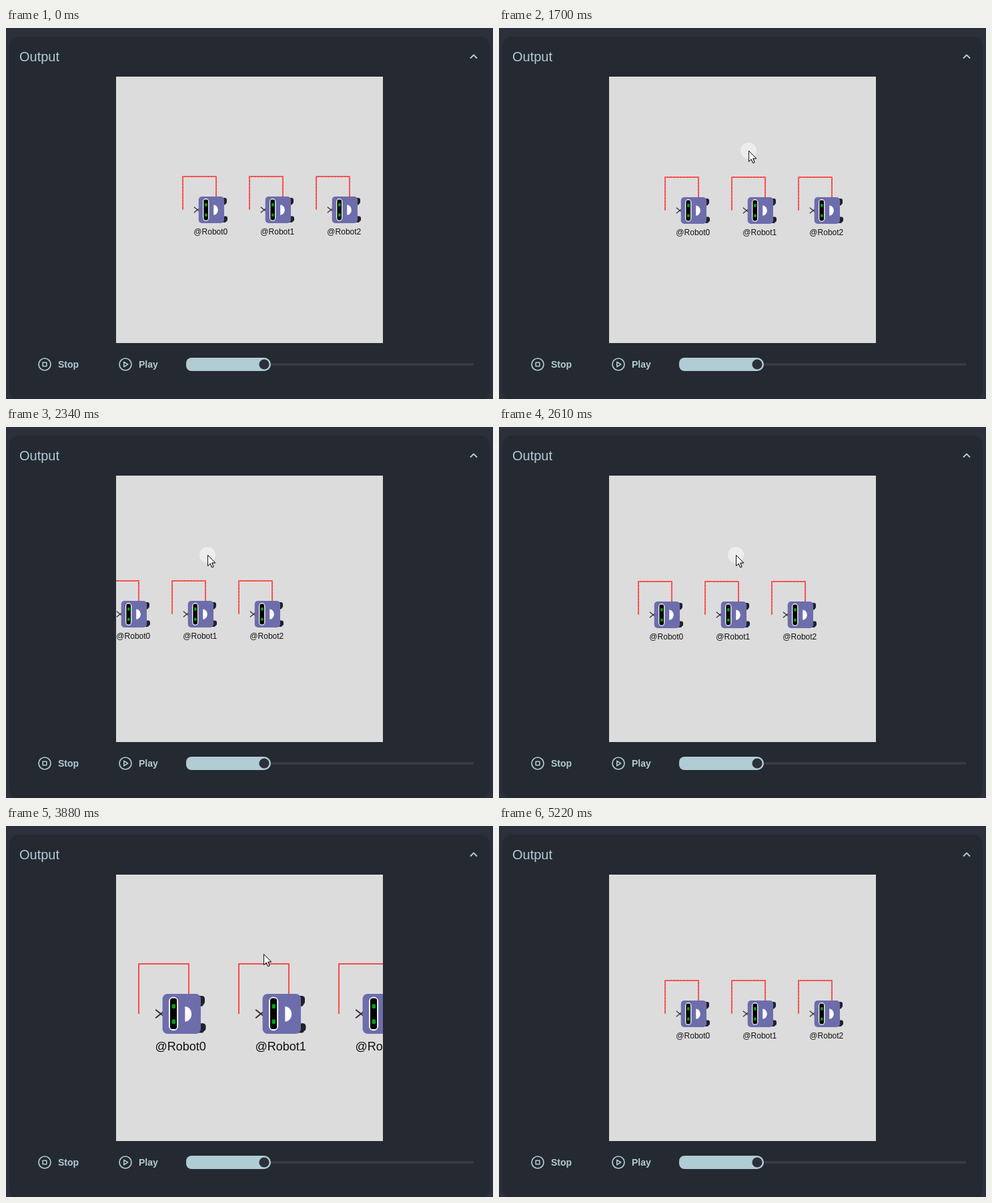
Recreate the animation shown at these times as an HTML page with a canvas. Size 730x557 px, loop 5.73 s.

```html
<!DOCTYPE html>
<html lang="en">
<head>
<meta charset="utf-8">
<title>Output</title>
<style>
  html, body { margin: 0; width: 100%; height: 100%; overflow: hidden; background: #2b303b; }
  canvas { display: block; }
</style>
</head>
<body>
<canvas id="stage" width="730" height="557"></canvas>
<script>
const ctx = document.getElementById('stage').getContext('2d');
const LOOP = 5730, STEP = 29.2, LAG = 55;
const FONT = '"Liberation Sans", Arial, sans-serif';
const PANEL = '#252932', MIST = '#b0ccd5', INK = '#1f2230';

// Sideways drag: [ms, x]
const SWING = [[1485, 0], [1905, -71], [2200, -127], [2285, -116], [2340, -99], [2585, -49], [2840, -15.5]];

const clamp = (v, lo = 0, hi = 1) => Math.min(hi, Math.max(lo, v));
const progress = (t, from, to) => clamp((t - from) / (to - from));

// Smooth curve through the keys, at rest at both ends
function follow(keys, t) {
  const last = keys.length - 1;
  if (t <= keys[0][0]) return keys[0][1];
  if (t >= keys[last][0]) return keys[last][1];
  const i = keys.findIndex(k => k[0] > t) - 1;
  const [t0, a] = keys[i], [t1, b] = keys[i + 1];
  const span = t1 - t0, u = (t - t0) / span, v = 1 - u;
  const slope = j => j === 0 || j === last ? 0 :
    (keys[j + 1][1] - keys[j - 1][1]) / (keys[j + 1][0] - keys[j - 1][0]) * span;
  return a * (1 + 2 * u) * v * v + slope(i) * u * v * v +
    b * u * u * (3 - 2 * u) - slope(i + 1) * u * u * v;
}

function bezier(a, b, c, d, u) {
  const v = 1 - u;
  return [0, 1].map(k =>
    a[k] * v ** 3 + 3 * b[k] * v * v * u + 3 * c[k] * v * u * u + d[k] * u ** 3);
}

const dragAt = t => [follow(SWING, t), 9 * progress(t, 1485, 2340) ** 1.6];

function cursorAt(t) {
  if (t < 1200) {
    const u = 1 - (1 - progress(t, 330, 1030)) ** 2;
    return bezier([450, 555], [400, 380], [310, 190], [401, 183], u);
  }
  if (t > 4600) {
    const u = progress(t, 4650, 5220) ** 1.4;
    return bezier([386, 192], [395, 230], [460, 400], [504, 560], u);
  }
  const [dx, dy] = dragAt(t);
  return [401 + dx, 183 + dy];
}

function zoomAt(t) {
  const steps = (from, every) => clamp(Math.floor((t - from) / every) + 1, 0, 6);
  return 1 + (steps(3260, 68) - steps(3880, 50)) / 10;
}

function box(x, y, w, h, r, color) {
  ctx.beginPath();
  ctx.roundRect(x, y, w, h, r);
  ctx.fillStyle = color;
  ctx.fill();
}

function disc(x, y, r, color) {
  ctx.beginPath();
  ctx.arc(x, y, r, 0, 7);
  ctx.fillStyle = color;
  ctx.fill();
}

function line(points, color, width, closed) {
  ctx.beginPath();
  points.forEach(p => ctx.lineTo(...p));
  if (closed) ctx.closePath();
  ctx.strokeStyle = color;
  ctx.lineWidth = width;
  ctx.stroke();
}

function label(text, x, y, font, color) {
  ctx.font = font + ' ' + FONT;
  ctx.fillStyle = color;
  ctx.fillText(text, x, y);
}

function button(x, text, icon) {
  ctx.beginPath();
  ctx.arc(x, 505, 9, 0, 7);
  ctx.strokeStyle = MIST;
  ctx.lineWidth = 1.7;
  ctx.stroke();
  line(icon.map(([dx, dy]) => [x + dx, 505 + dy]), MIST, 1.6, true);
  label(text, x + 20, 510, 'bold 14px', MIST);
}

function drawPanel() {
  ctx.fillStyle = '#2b303b';
  ctx.fillRect(0, 0, 730, 557);
  box(5, 13, 720, 546, 14, PANEL);
  label('Output', 20, 50, '20px', MIST);
  line([[696, 45.5], [701, 40.5], [706, 45.5]], MIST, 2);

  ctx.lineJoin = 'round';
  button(58, 'Stop', [[-2.8, -2.8], [2.8, -2.8], [2.8, 2.8], [-2.8, 2.8]]);
  button(179, 'Play', [[-2.2, -3.7], [3.6, 0], [-2.2, 3.7]]);

  box(270, 503, 431, 4, 2, '#353a44');
  box(270, 495, 127, 20, [8, 10, 10, 8], MIST);
  disc(387, 505, 7.6, '#2b303b');
}

function drawTrail(scale) {
  const trail = [[0, 0], [0, -50], [50, -50], [50, -10]];
  ctx.lineJoin = 'round';
  line(trail, '#fa4a4a', 2 / scale);
  if (scale > 1) return;
  ctx.setLineDash([2, 3]);
  line(trail, '#f56262', 2);
  ctx.setLineDash([]);
}

function drawRobot(name) {
  box(57, -18, 9, 9, 3, INK);
  box(57, -13, 7.5, 5.5, 2, INK);
  box(57, 9.5, 10, 8, 3, INK);
  box(57, 13, 8, 6, 2, INK);
  for (const side of [-1, 1]) line([[16.8, 4.2 * side], [24.5, -2 * side]], '#2c2c2c', 1.2);
  box(23.7, -20, 38.3, 40, 5, '#6d6dac');
  box(30, -17, 9.4, 33.8, 4.7, '#fff');
  box(31.3, -15.6, 6.8, 31, 2.4, '#050505');
  for (const y of [-7.6, 7.8]) box(33, y - 2.3, 3.8, 4.6, 1.3, '#0b9a14');
  ctx.beginPath();
  ctx.ellipse(46.2, 0.2, 6.6, 7.6, 0, -Math.PI / 2, Math.PI / 2);
  ctx.fillStyle = '#fff';
  ctx.fill();
  ctx.textAlign = 'center';
  label(name, 41.8, 36.5, '12px', '#111');
  ctx.textAlign = 'left';
}

function drawScene([dx, dy], scale) {
  ctx.save();
  ctx.beginPath();
  ctx.rect(165, 73, 400, 400);
  ctx.clip();
  ctx.fillStyle = '#dcdcdc';
  ctx.fillRect(165, 73, 400, 400);
  ctx.translate(Math.ceil(364.5 + dx), Math.round(273 + dy));
  ctx.scale(scale, scale);
  for (let n = 0; n < 3; n++) {
    ctx.save();
    ctx.translate((n - 1) * 100, 0);
    drawTrail(scale);
    drawRobot('@Robot' + n);
    ctx.restore();
  }
  ctx.restore();
}

function drawCursor(x, y, pressed) {
  if (pressed) disc(x, y, 12, 'rgba(244,244,250,.7)');
  ctx.save();
  ctx.translate(x + 0.5, y + 0.5);
  ctx.lineJoin = 'miter';
  line([[0, 0], [0, 16], [3.7, 12.5], [6.2, 18.2], [8.6, 17.2], [6.2, 11.6], [11.2, 11.4]], '#111', 1, true);
  ctx.fillStyle = '#fff';
  ctx.fill();
  ctx.stroke();
  ctx.restore();
}

function draw(t) {
  const tick = 1960 + Math.floor((t - 1960) / STEP) * STEP;
  drawPanel();
  drawScene(dragAt(tick - LAG), zoomAt(t));
  if (t >= 330 && t < 5220) {
    const [x, y] = cursorAt(tick).map(Math.round);
    drawCursor(x, y, t >= 1210 && t < 2920);
  }
}

function loop() {
  draw(performance.now() % LOOP);
  requestAnimationFrame(loop);
}
loop();
</script>
</body>
</html>
```
